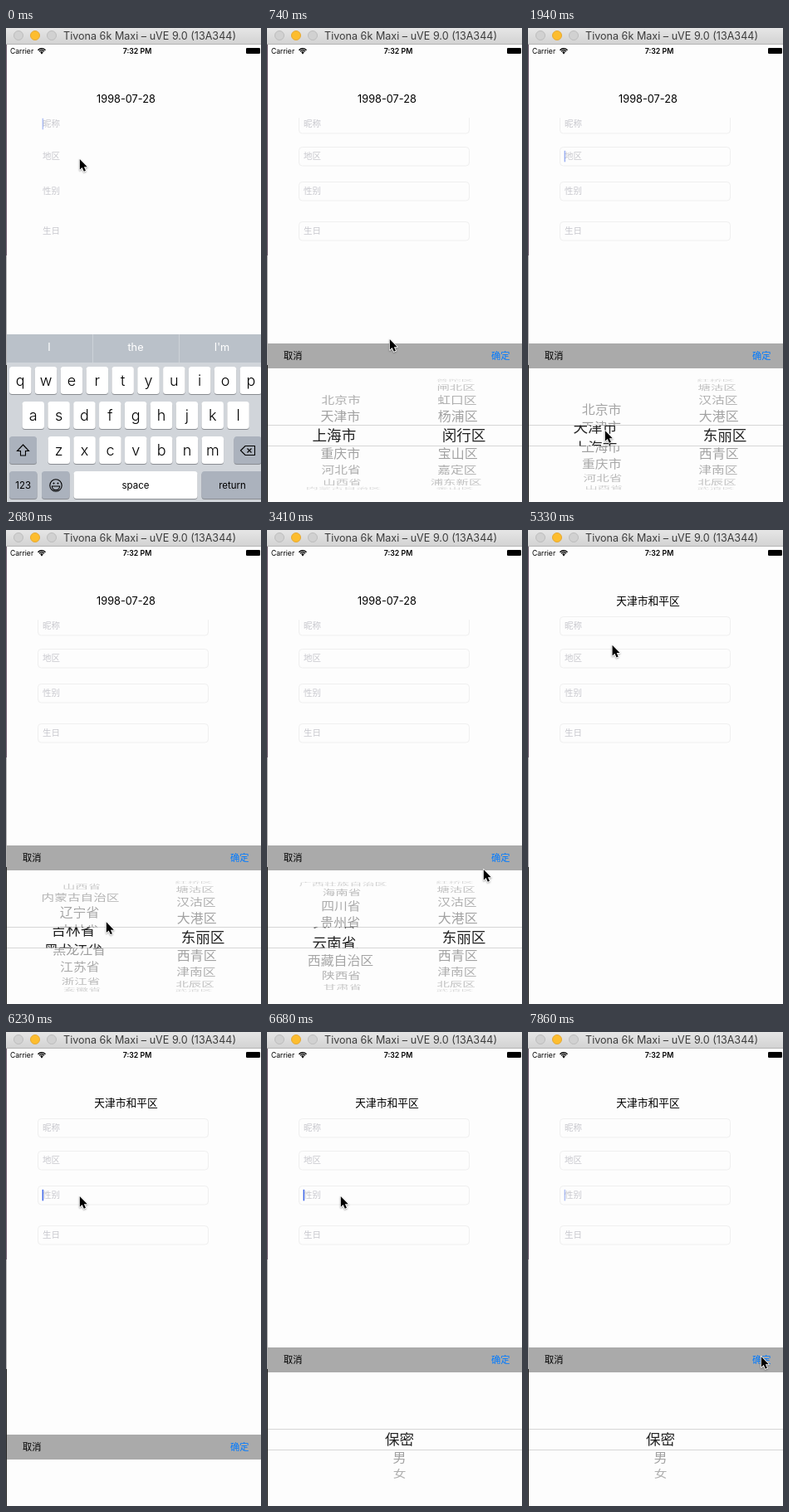
Animation of 307 by 571 pixels, one loop 8000 ms. Source, as an HTML page with a canvas:

```html
<!DOCTYPE html>
<html lang="zh">
<head>
<meta charset="utf-8">
<title>Picker demo</title>
<style>
html, body { margin: 0; width: 100%; height: 100%; overflow: hidden; background: #fdfdfd; }
canvas { display: block; width: 307px; height: 571px; }
</style>
</head>
<body>
<canvas id="stage"></canvas>
<script>
const W = 307, H = 571, LOOP = 8000, TICKS = 54;
const canvas = document.getElementById('stage');
const ctx = canvas.getContext('2d');
const dpr = window.devicePixelRatio || 1;
canvas.width = W * dpr;
canvas.height = H * dpr;

const FONT = 'Inter, "Noto Sans CJK SC", "Noto Sans CJK", sans-serif';
const provinces = ('北京市 天津市 上海市 重庆市 河北省 山西省 内蒙古自治区 辽宁省 吉林省 黑龙江省 江苏省 浙江省 ' +
  '安徽省 福建省 江西省 山东省 河南省 湖北省 湖南省 广东省 广西壮族自治区 海南省 四川省 贵州省 云南省 ' +
  '西藏自治区 陕西省 甘肃省 青海省 宁夏回族自治区 新疆维吾尔自治区').split(' ');
const shanghai = '普陀区 闸北区 虹口区 杨浦区 闵行区 宝山区 嘉定区 浦东新区 金山区'.split(' ');
const tianjin = '红桥区 塘沽区 汉沽区 大港区 东丽区 西青区 津南区 北辰区 武清区'.split(' ');
const genders = ['保密', '男', '女'];
const fields = [['昵称', 104.5], ['地区', 143.5], ['性别', 185.5], ['生日', 233.5]];

// Keyframes: [tick, value...]
const pointer = [[0, 88, 157], [2, 88, 157], [5, 147, 374], [9, 92, 484], [17, 92, 484], [23, 260, 408],
  [25, 276, 397], [29, 277, 394], [30, 277, 394], [33, 125, 140], [35, 105, 118], [39, 88, 197],
  [45, 88, 197], [49, 150, 400], [51, 215, 428], [53, 280, 390]];
const scroll = [[9, 2], [11, 1.3], [12, 1], [13, 1.38], [17, 5], [20, 15], [23, 23.73], [26, 25.4]];
const blink = [1, 1, 1, 1, .4, 0, .5];
const DISMISS = 27.3, PRESENT = 41.425;

function track(keys, n) {
  let i = keys.findIndex(k => k[0] > n);
  if (i < 0) return keys[keys.length - 1].slice(1);
  if (i === 0) return keys[0].slice(1);
  const a = keys[i - 1], b = keys[i], p = (n - a[0]) / (b[0] - a[0]);
  return a.slice(1).map((v, j) => v + (b[j + 1] - v) * p);
}

// Share of the slide still to go, as a critically damped spring
function spring(ticks) {
  const u = Math.max(0, ticks) * 2.667;
  return (1 + u) * Math.exp(-u);
}

function rect(x, y, w, h, color) {
  ctx.fillStyle = color;
  ctx.fillRect(x, y, w, h);
}

function round(x, y, w, h, r) {
  ctx.beginPath();
  ctx.roundRect(x, y, w, h, r);
}

function shape(points) {
  ctx.beginPath();
  points.forEach(([x, y]) => ctx.lineTo(x, y));
  ctx.closePath();
}

function text(s, x, y, size, color = '#000', align = 'center', weight = 400) {
  ctx.font = `${weight} ${size}px ${FONT}`;
  ctx.textAlign = align;
  ctx.fillStyle = color;
  ctx.fillText(s, x, y + size * .37);
}

function disc(x, y, r, fill, line) {
  ctx.beginPath();
  ctx.arc(x, y, r, 0, 7);
  ctx.fillStyle = fill;
  ctx.fill();
  ctx.lineWidth = 1;
  ctx.strokeStyle = line;
  ctx.stroke();
}

function drawWindow() {
  rect(0, 0, W, H, '#fdfdfd');
  rect(0, 20, 1, 254, '#6a5868');
  rect(0, 274, 1, 132, '#b4b2b4');
  rect(0, 406, 1, 165, '#222');
  const bar = ctx.createLinearGradient(0, 0, 0, 20);
  bar.addColorStop(0, '#e6e6e6');
  bar.addColorStop(1, '#d2d2d2');
  rect(0, 0, W, 19, bar);
  rect(0, 19, W, 1, '#b5b5b5');
  disc(15, 9, 5.5, '#d1d1d1', '#bdbdbd');
  disc(35, 9, 5.5, '#fdbd2e', '#e5a935');
  disc(55, 9, 5.5, '#d1d1d1', '#bdbdbd');
  text('Tivona 6k Maxi – uVE 9.0 (13A344)', 173, 9.5, 12.6, '#3c3c3c');

  text('Carrier', 5, 28, 8.6, '#000', 'left');
  text('7:32 PM', 158, 28, 8.8, '#000', 'center', 600);
  ctx.strokeStyle = '#000';
  ctx.lineWidth = 1.4;
  for (const r of [2, 4.1, 6.2]) {
    ctx.beginPath();
    ctx.arc(43, 31, r, -Math.PI * .76, -Math.PI * .24);
    ctx.stroke();
  }
  disc(43, 30.6, .5, '#000', '#000');
  round(289, 24, 17, 7, 1.3);
  ctx.fill();
}

function drawForm(n) {
  const picked = n >= DISMISS;
  text(picked ? '天津市和平区' : '1998-07-28', 144.5, 85, 12.75);
  ctx.save();
  ctx.beginPath();
  ctx.rect(0, picked ? 0 : 108, W, H);
  ctx.clip();
  for (const [name, y] of fields) {
    if (n > 0) {
      round(38.5, y, 205, 22.5, 4);
      ctx.strokeStyle = '#efefef';
      ctx.lineWidth = 1;
      ctx.stroke();
    }
    text(name, 44, y + 10.8, 10.5, '#c7c7cd', 'left');
  }
  ctx.restore();

  const active = n < 1 ? 0 : n < 17 ? 1 : n >= 42 ? 2 : -1;
  if (active >= 0) {
    ctx.globalAlpha = active ? blink[n % 7] : .4;
    rect(43.6, fields[active][1] + 4.3, 1.5, 13.5, '#3f66e8');
    ctx.globalAlpha = 1;
  }
}

function key(x, y, w, label, dark, size = 18) {
  round(x, y + 1, w, 33, 3.5);
  ctx.fillStyle = '#898c91';
  ctx.fill();
  round(x, y, w, 33, 3.5);
  ctx.fillStyle = dark ? '#abb2bd' : '#fff';
  ctx.fill();
  text(label, x + w / 2, y + 16.3, size, '#000', 'center', size > 12 ? 300 : 400);
}

function drawKeyboard() {
  rect(1, 369, W, 34, '#bac1c9');
  rect(1, 403, W, 168, '#d1d5da');
  rect(104, 369, 1, 34, '#cdd2d8');
  rect(208, 369, 1, 34, '#cdd2d8');
  ['I', 'the', "I'm"].forEach((s, i) => text(s, 52 + i * 104, 384.5, 12.75, '#fff'));
  [['qwertyuiop', 4, 408], ['asdfghjkl', 19.5, 450], ['zxcvbnm', 50.5, 492]].forEach(([row, x, y]) =>
    [...row].forEach((c, i) => key(x + i * 30.85, y, 26.5, c)));
  key(4, 492, 33, '', true);
  key(274.5, 492, 33, '', true);
  key(4, 534, 33.5, '123', true, 11.5);
  key(43, 534, 33.5, '', true);
  key(81.5, 534, 149, 'space', false, 11.5);
  key(235.5, 534, 74, 'return', true, 11.5);

  ctx.strokeStyle = '#000';
  ctx.lineWidth = 1.1;
  shape([[20.5, 502], [27.5, 509.5], [23.5, 509.5], [23.5, 515], [17.5, 515], [17.5, 509.5], [13.5, 509.5]]);
  ctx.stroke();
  shape([[282.5, 509], [288, 503.5], [299.5, 503.5], [299.5, 514.5], [288, 514.5]]);
  ctx.stroke();
  ctx.beginPath();
  for (const d of [-2.5, 2.5]) {
    ctx.moveTo(293 - d, 506.5);
    ctx.lineTo(293 + d, 511.5);
  }
  ctx.stroke();
  ctx.beginPath();
  ctx.arc(60, 551, 7.2, 0, 7);
  ctx.stroke();
  ctx.beginPath();
  ctx.arc(60, 552, 4.6, 0, Math.PI);
  ctx.closePath();
  ctx.stroke();
  disc(57.5, 548.5, .6, '#000', '#000');
  disc(62.5, 548.5, .6, '#000', '#000');
}

// One wheel: rows sit on a cylinder and lean towards the middle of the picker
function drawRows(items, cx, pos, color) {
  items.forEach((item, i) => {
    const angle = (i - pos) * .347;
    if (Math.abs(angle) > 1.45) return;
    const c = Math.cos(angle), scale = 1 - .07 * (1 - c);
    ctx.save();
    ctx.translate((cx - 159.5) * scale, 66 * Math.sin(angle));
    ctx.scale(scale, c);
    ctx.globalAlpha = color ? 1 : .1 + .28 * c;
    text(item, 0, 0, 16, color || '#000');
    ctx.restore();
  });
}

function drawWheels(wheels) {
  const layer = (boxes, zoom, color) => {
    ctx.save();
    ctx.beginPath();
    boxes.forEach(([y, h]) => ctx.rect(1, y, W, h));
    ctx.clip();
    ctx.translate(159.5, 490.3);
    ctx.scale(zoom, zoom);
    wheels.forEach(([items, cx, pos]) => drawRows(items, cx, pos, color));
    ctx.restore();
  };
  layer([[410, 68.5], [503.5, 80]], 1);
  layer([[478.5, 25]], 1.1, '#222');
}

function drawPicker(n) {
  const left = n < 30 ? 1 - spring(n - DISMISS) : spring(n - PRESENT);
  if (left > .99) return;
  ctx.save();
  ctx.translate(0, Math.round(left * 192));
  rect(1, 380, W, 30, '#aaa');
  text('取消', 20, 395, 11.25, '#000', 'left');
  text('确定', 270, 395, 11.25, '#007aff', 'left');
  rect(1, 410, W, 162, '#fdfdfd');
  rect(1, 478, W, 1, '#d6d6d6');
  rect(1, 503, W, 1, '#d6d6d6');
  drawWheels(n > 40 ? [[genders, 159.5, 0]] : [
    [provinces, 88, track(scroll, n)[0]],
    [n < 12 ? shanghai : tianjin, 230, 4]
  ]);
  ctx.restore();
}

function drawPointer(n) {
  const [x, y] = track(pointer, n);
  ctx.save();
  ctx.translate(x + .8, y + 1);
  ctx.scale(.85, .85);
  shape([[0, 0], [0, 15], [3.4, 11.9], [5.9, 17.4], [8.4, 16.3], [6, 11], [10.6, 11]]);
  ctx.shadowColor = 'rgba(0,0,0,.35)';
  ctx.shadowBlur = 2 * dpr;
  ctx.shadowOffsetY = dpr;
  ctx.lineJoin = 'round';
  ctx.lineWidth = 2;
  ctx.strokeStyle = '#fff';
  ctx.stroke();
  ctx.shadowColor = 'transparent';
  ctx.fillStyle = '#000';
  ctx.fill();
  ctx.restore();
}

function draw(now) {
  const n = Math.floor(((now % LOOP) + 7) * TICKS / LOOP) % TICKS;
  ctx.setTransform(dpr, 0, 0, dpr, 0, 0);
  drawWindow();
  drawForm(n);
  if (n < 1) drawKeyboard();
  else drawPicker(n);
  drawPointer(n);
}

const start = performance.now();
function loop() {
  draw(performance.now() - start);
  requestAnimationFrame(loop);
}
loop();
</script>
</body>
</html>
```
